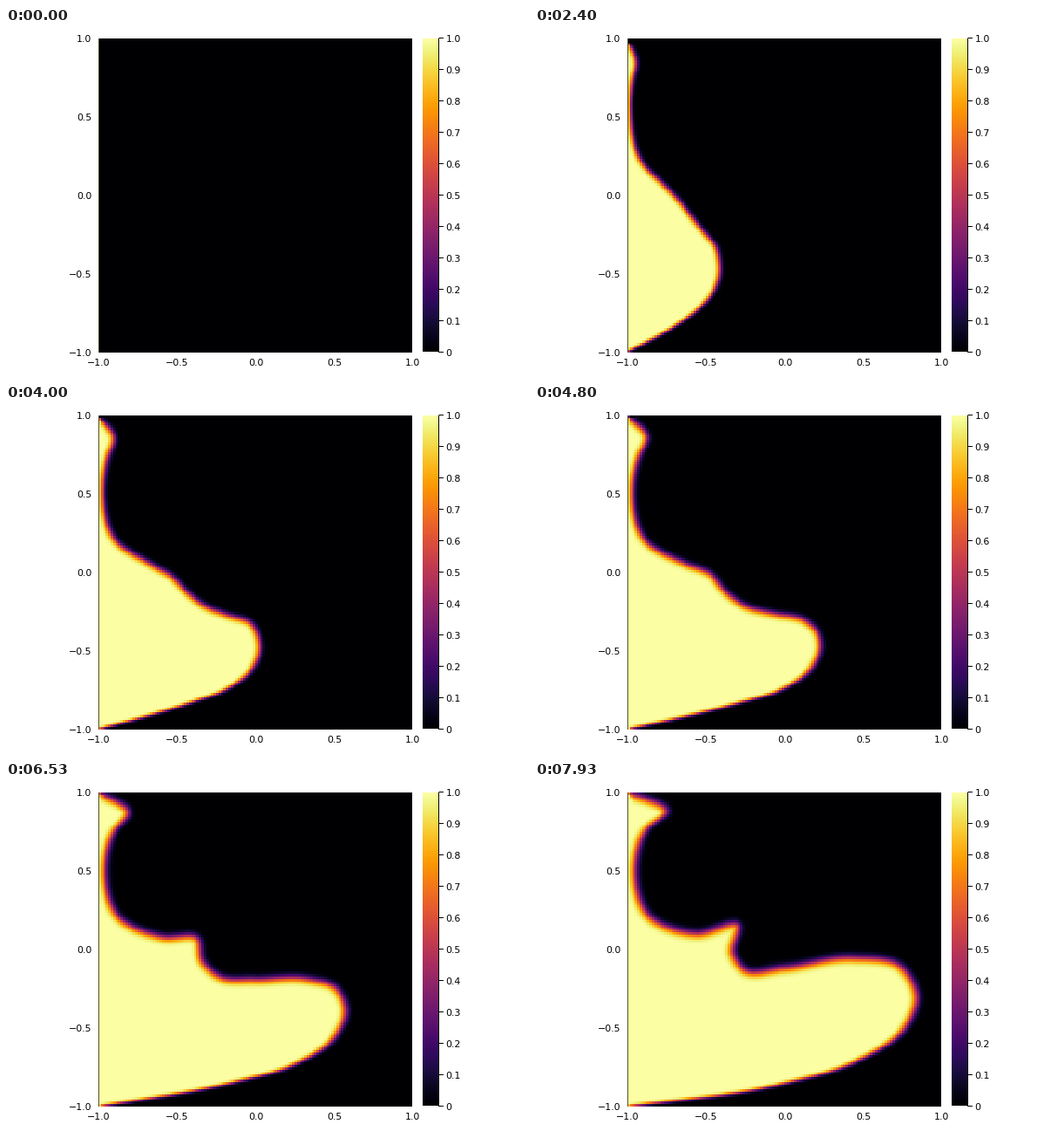
A matplotlib script that plays this animation: 600x400 px, repeating every 8000 ms.

```python
import math

import numpy as np
import matplotlib.pyplot as plt
from matplotlib.animation import FuncAnimation

W, H, DPI = 600, 400, 100
FRAMES, LOOP = 120, 8000
LEFT, TOP, SIDE, CELLS = 106, 12, 360, 128

# Key points of the front: height at the inflow edge, place at 4.8 s, place at 7.93 s.
POINTS = [
    (41, (128, 38), (150, 35)),     # upper bump
    (60, (119, 59), (128, 54)),
    (92, (112, 92), (115, 92)),     # neck
    (152, (126, 155), (130, 153)),  # shoulder
    (183, (172, 182), (185, 174)),
    (198, (202, 195), (233, 165)),  # hook
    (212, (216, 212), (227, 196)),
    (226, (242, 231), (240, 215)),  # trough
    (238, (272, 239), (285, 213)),
    (250, (312, 249), (365, 201)),  # lobe
    (263, (323, 260), (422, 212)),
    (277, (327, 276), (440, 246)),  # tip
    (300, (318, 300), (427, 280)),
    (322, (283, 326), (370, 320)),
    (340, (235, 341), (285, 346)),
]
TIMES = np.array([0, 1.6, 4.8, 7.93])
CORNERS = [LEFT - 2, TOP - 1], [LEFT - 2, TOP + SIDE + .5]


def inflow(y):
    """Speed in px/s at the left edge: a lopsided cosine hump and a small bump."""
    span = np.where(y < 277, 135, 93)
    hump = 41.5 * np.cos(np.pi / 2 * (y - 277) / span)
    bump = 2.8 * np.exp(-((y - 41) / 18) ** 2)
    return .9 + bump + (hump + np.hypot(hump, 7)) / 2


def hermite(s, y, q):
    """Smooth cubic through rows y at knots s, evaluated at q."""
    m = np.gradient(y, s, axis=0)
    i = np.clip(np.searchsorted(s, q, side="right") - 1, 0, len(s) - 2)
    h = (s[i + 1] - s[i])[:, None]
    u = (q - s[i])[:, None] / h
    a, b = y[i], y[i + 1]
    return (a + u * u * (3 - 2 * u) * (b - a)
            + u * (1 - u) ** 2 * h * m[i] - u * u * (1 - u) * h * m[i + 1])


def make_paths():
    start = np.array([p[0] for p in POINTS], float)
    edge = np.column_stack([np.full(len(start), LEFT), start])
    early = edge + np.column_stack([inflow(start) * TIMES[1], 0 * start])
    middle, end = (np.array([p[k] for p in POINTS], float) for k in (1, 2))
    return np.stack([edge, early, middle, end]).reshape(len(TIMES), -1)


PATHS = make_paths()

cell = SIDE / CELLS
axis = (np.arange(CELLS) + .5) * cell
gx, gy = np.meshgrid(LEFT + axis, TOP + axis)
grid = np.column_stack([gx.ravel(), gy.ravel()]).astype(np.float32)

STEP_X = np.linspace(-4, 4, 401)
STEP_Y = np.array([.5 * math.erfc(v / math.sqrt(2)) for v in STEP_X])


def field(t):
    moving = hermite(TIMES, PATHS, np.array([t]))[0].reshape(-1, 2)
    pts = np.vstack([CORNERS[0], moving, CORNERS[1]])
    s = np.append(0, np.cumsum(np.hypot(*np.diff(pts, axis=0).T)))
    curve = hermite(s, pts, np.linspace(0, s[-1], 260))

    tangent = np.gradient(curve, axis=0)
    normal = np.column_stack([tangent[:, 1], -tangent[:, 0]])
    normal /= np.hypot(*normal.T)[:, None]

    # The front diffuses with time, least where it faces down or hugs the wall.
    down = np.clip(normal[:, 1], 0, 1)
    blur = 4.4 * (t / 8) ** .4 * np.sqrt(1 - .9 * down ** 2)
    blur = np.minimum(blur, .6 * np.maximum(curve[:, 0] - LEFT, 0)) + .3

    c = curve.astype(np.float32)
    near = ((c ** 2).sum(1) - 2 * grid @ c.T).argmin(1)
    dist = ((grid - curve[near]) * normal[near]).sum(1) / blur[near]
    return np.interp(dist, STEP_X, STEP_Y).reshape(gx.shape)


fig = plt.figure(figsize=(W / DPI, H / DPI), dpi=DPI, facecolor="white")
ax = fig.add_axes([0, 0, 1, 1])
ax.axis("off")


def label(x, y, text, ha):
    ax.text(x, y, text, ha=ha, va="baseline", color="black",
            family="DejaVu Sans", size=11 * 72 / DPI)


def line(xs, ys, color="black"):
    ax.plot(xs, ys, color=color, lw=72 / DPI, solid_capstyle="butt",
            snap=False, zorder=3)


def heatmap(data, x0, x1, y0, y1):
    return ax.imshow(data, cmap="inferno", vmin=0, vmax=1, aspect="auto",
                     interpolation="nearest", extent=(x0, x1, y1, y0))


heat = heatmap(field(0), LEFT, LEFT + SIDE, TOP, TOP + SIDE)
heatmap(np.linspace(1, 0, 256)[:, None], 478, 496, 12, 371)
ax.set_xlim(0, W)
ax.set_ylim(H, 0)

line([LEFT + .5] * 2, [TOP, TOP + SIDE], "#50502f")
for k in range(5):
    text = f"{k / 2 - 1:.1f}".replace("-", "\u2212")
    label(LEFT + .5 + k * SIDE / 4, 387, text, "center")
    label(98.5, TOP + SIDE - k * SIDE / 4 + 4, text, "right")

line([496.5, 496.5], [12, 372])
for k in range(11):
    y = 371.5 - round(k * 35.95)
    line([496.5, 502], [y, y])
    label(504.5, y + 4, f"{k / 10:.1f}" if k else "0", "left")


def update(k):
    heat.set_data(field(k * LOOP / FRAMES / 1000))
    return [heat]


anim = FuncAnimation(fig, update, frames=FRAMES, interval=LOOP / FRAMES,
                     repeat=True, repeat_delay=0, blit=False)
plt.show()
```
